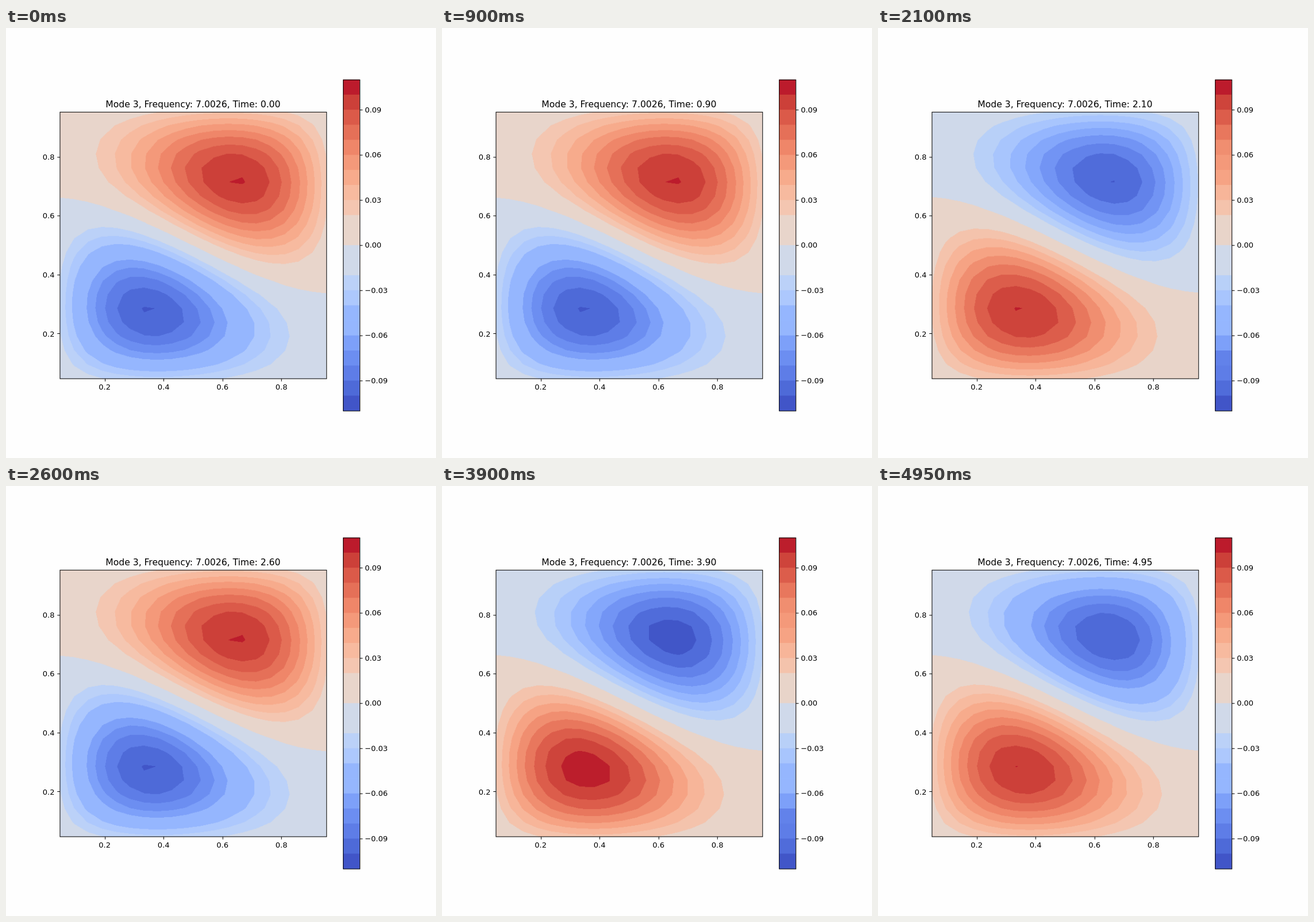
Recreate the animation shown at these times as an HTML page with a canvas. Size 748 by 748 pixels, loop 5 s.

```html
<!DOCTYPE html>
<html lang="en">
<head>
<meta charset="utf-8">
<title>Mode 3</title>
<style>
  html, body { margin: 0; width: 100%; height: 100%; overflow: hidden; background: #fefefe; }
  canvas { display: block; }
</style>
</head>
<body>
<canvas id="stage" width="748" height="748"></canvas>
<script>
const ctx = document.getElementById('stage').getContext('2d');
const FIGURE = 800;                  // layout units, scaled to the stage
const SCALE = 748 / FIGURE;
const FRAME_MS = 50, FRAMES = 100;
const AX = { x: 100, y: 156, size: 496 };
const BAR = { x: 627, y: 96, w: 30.8, h: 616, bands: 22 };
const PT = 100 / 72;
const LINE = 0.8 * PT;

// Diverging blue-to-red colour map, evenly spaced stops.
const STOPS = `3b4cc0 445acc 4d68d7 5775e1 6282ea 6c8ef1 779af7 82a5fb 8db0fe 98b9ff a3c2ff
  aec9fd b8d0f9 c2d5f4 ccd9ee d5dbe6 dddddd e5d8d1 ecd3c5 f1ccb9 f5c4ad f7bba0 f7b194 f7a687
  f49a7b f18d6f ec7f63 e57058 de604d d55042 cb3e38 c0282f b40426`
  .split(/\s+/).map(hex => [0, 2, 4].map(i => parseInt(hex.slice(i, i + 2), 16)));

function colorAt(u) {
  const pos = Math.min(255, Math.floor(u * 256)) / 255 * (STOPS.length - 1);
  const i = Math.min(STOPS.length - 2, Math.floor(pos));
  return STOPS[i].map((c, k) => Math.round(c + (STOPS[i + 1][k] - c) * (pos - i)));
}
const bandColors = n => Array.from({ length: n }, (_, k) => colorAt((k + 0.5) / n));

// Eigenmode of the discrete Laplacian on the interior nodes of the unit square.
const N = 20, H = 1 / (N + 1), PI = Math.PI;
const OMEGA = 2 / H * Math.hypot(Math.sin(PI * H / 2), Math.sin(PI * H));
const MIX = Math.atan(0.493);
const mode = [];
for (let j = 0; j < N; j++) {
  for (let i = 0; i < N; i++) {
    const x = PI * (i + 1) * H, y = PI * (j + 1) * H;
    mode.push(-2 * H * (Math.cos(MIX) * Math.sin(x) * Math.sin(2 * y) +
                        Math.sin(MIX) * Math.sin(2 * x) * Math.sin(y)));
  }
}
const PEAK = Math.max(...mode);

// Smallest round step that splits the range into at most 21 parts.
function niceStep(range) {
  const raw = range / 21, unit = 10 ** Math.floor(Math.log10(raw));
  return unit * [1, 1.5, 2, 2.5, 3, 4, 5, 6, 8, 10].find(s => s * unit >= raw);
}

const plot = document.createElement('canvas');
plot.width = plot.height = AX.size;
const plotCtx = plot.getContext('2d');
const image = plotCtx.createImageData(AX.size, AX.size);
const bands = new Uint8Array(AX.size * AX.size);

// Marks every pixel that a convex polygon touches.
function fillPolygon(points, value) {
  const ys = points.map(p => p[1]);
  const top = Math.max(0, Math.floor(Math.min(...ys)));
  const bottom = Math.min(AX.size, Math.ceil(Math.max(...ys)));
  for (let y = top; y < bottom; y++) {
    let lo = Infinity, hi = -Infinity;
    points.forEach((p, i) => {
      const q = points[(i + 1) % points.length];
      if (Math.max(p[1], q[1]) < y || Math.min(p[1], q[1]) > y + 1) return;
      for (const end of [p, q]) {
        const yc = Math.min(y + 1, Math.max(y, end[1]));
        const x = yc === end[1] ? end[0] : p[0] + (q[0] - p[0]) * (yc - p[1]) / (q[1] - p[1]);
        lo = Math.min(lo, x);
        hi = Math.max(hi, x);
      }
    });
    if (hi < lo) continue;
    const row = y * AX.size;
    bands.fill(value, row + Math.max(0, Math.floor(lo)), row + Math.min(AX.size, Math.ceil(hi)));
  }
}

function fillLevel(amp, level, value) {
  const cell = AX.size / (N - 1);
  const node = (i, j) => [i * cell, AX.size - j * cell, amp * mode[j * N + i]];
  for (let j = 0; j < N - 1; j++) {
    for (let i = 0; i < N - 1; i++) {
      const corners = [node(i, j), node(i + 1, j), node(i + 1, j + 1), node(i, j + 1)];
      if (corners.every(c => c[2] < level)) continue;
      const polygon = [];
      corners.forEach((a, k) => {
        const b = corners[(k + 1) % 4];
        if (a[2] >= level) polygon.push(a);
        if ((a[2] >= level) !== (b[2] >= level)) {
          const f = (level - a[2]) / (b[2] - a[2]);
          polygon.push([a[0] + (b[0] - a[0]) * f, a[1] + (b[1] - a[1]) * f]);
        }
      });
      fillPolygon(polygon, value);
    }
  }
}

// Colours sharing a coarse RGB cell collapse to their area-weighted mean.
function reducePalette(colors, areas) {
  const cells = new Map();
  const key = ([r, g, b]) => (r >> 5) << 8 | (g >> 4) << 4 | b >> 5;
  colors.forEach((c, i) => {
    const cell = cells.get(key(c)) || [0, 0, 0, 0];
    c.forEach((v, k) => { cell[k] += v * areas[i]; });
    cell[3] += areas[i];
    cells.set(key(c), cell);
  });
  return colors.map(c => {
    const cell = cells.get(key(c));
    return cell[3] ? cell.slice(0, 3).map(v => Math.floor(v / cell[3])) : c;
  });
}

// Draws the filled contours and returns the colour bar palette.
function drawField(time) {
  const amp = Math.cos(OMEGA * time);
  const peak = PEAK * Math.abs(amp);
  const step = niceStep(2 * peak);
  const half = Math.ceil(peak / step), count = 2 * half;
  bands.fill(0);
  for (let k = 1; k < count; k++) fillLevel(amp, (k - half) * step, k);

  const areas = new Array(count).fill(0);
  bands.forEach(k => areas[k]++);
  const barArea = BAR.h / BAR.bands * Math.round(BAR.w);
  const palette = reducePalette(
    [...bandColors(count), ...bandColors(BAR.bands)],
    [...areas, ...new Array(BAR.bands).fill(barArea)]);

  bands.forEach((k, i) => {
    const [r, g, b] = palette[k];
    image.data[4 * i] = r;
    image.data[4 * i + 1] = g;
    image.data[4 * i + 2] = b;
    image.data[4 * i + 3] = 255;
  });
  plotCtx.putImageData(image, 0, 0);
  ctx.drawImage(plot, AX.x, AX.y);
  return palette.slice(count);
}

const snap = v => Math.floor(v + 0.5) + 0.5;

function line(x1, y1, x2, y2) {
  ctx.beginPath();
  ctx.moveTo(x1, y1);
  ctx.lineTo(x2, y2);
  ctx.stroke();
}

function label(text, x, y, align, size = 10) {
  ctx.font = `${size * PT}px "DejaVu Sans", sans-serif`;
  ctx.textAlign = align;
  ctx.fillText(text, x, y);
}

function drawAxes() {
  const bottom = AX.y + AX.size;
  ctx.strokeRect(AX.x + 0.5, AX.y + 0.5, AX.size, AX.size);
  for (const v of [0.2, 0.4, 0.6, 0.8]) {
    const d = (v - H) / (1 - 2 * H) * AX.size;
    const x = AX.x + d, y = bottom - d;
    line(snap(x), bottom + 0.5, snap(x), bottom + 5.5);
    line(AX.x + 0.5, snap(y), AX.x - 4.5, snap(y));
    label(v.toFixed(1), x, bottom + 21, 'center');
    label(v.toFixed(1), AX.x - 9.72, Math.round(y + 5.3), 'right');
  }
}

function drawBar(colors) {
  const bandH = BAR.h / BAR.bands, right = snap(BAR.x + BAR.w);
  colors.slice().reverse().forEach((c, k) => {
    ctx.fillStyle = `rgb(${c})`;
    ctx.fillRect(BAR.x, BAR.y + k * bandH, BAR.w, BAR.h - k * bandH);
  });
  ctx.fillStyle = '#000';
  ctx.strokeRect(BAR.x + 0.5, BAR.y + 0.5, right - BAR.x - 0.5, BAR.h);
  for (let k = -3; k <= 3; k++) {
    const y = BAR.y + BAR.h / 2 - 3 * k * bandH;
    line(right, snap(y), right + 5, snap(y));
    label((k < 0 ? '\u2212' : '') + (Math.abs(k) * 0.03).toFixed(2),
      BAR.x + BAR.w + 9.72, Math.round(y + 5.3), 'left');
  }
}

function draw(frame) {
  const time = frame * FRAME_MS / 1000;
  ctx.setTransform(SCALE, 0, 0, SCALE, 0, 0);
  ctx.fillStyle = '#fefefe';
  ctx.fillRect(0, 0, FIGURE, FIGURE);
  ctx.strokeStyle = '#000';
  ctx.lineWidth = LINE;
  drawBar(drawField(time));
  drawAxes();
  label(`Mode 3, Frequency: ${OMEGA.toFixed(4)}, Time: ${time.toFixed(2)}`,
    AX.x + AX.size / 2, AX.y - 8.3, 'center', 12);
}

const start = performance.now();
let shown = -1;
function tick() {
  const frame = Math.floor((performance.now() - start) / FRAME_MS) % FRAMES;
  if (frame !== shown) draw(shown = frame);
  requestAnimationFrame(tick);
}
tick();
</script>
</body>
</html>
```
